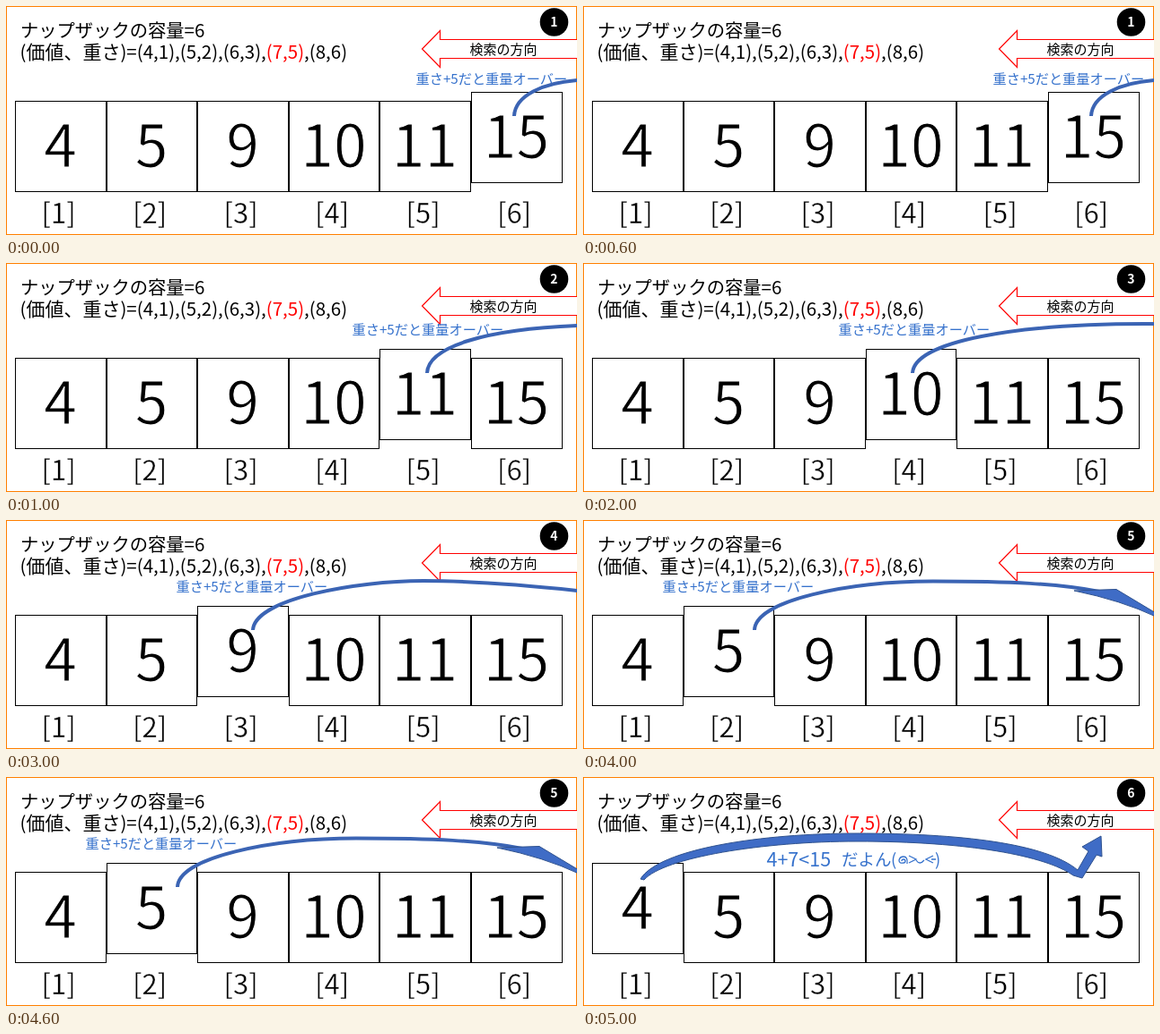
Recreate the animation shown at these times as an HTML page. Size 636 by 256 pixels, loop 6 s.

```html
<!DOCTYPE html>
<html lang="ja">
<head>
<meta charset="utf-8">
<style>
html, body { margin: 0; width: 100%; height: 100%; overflow: hidden; background: #fff; }
svg { display: block; width: 636px; height: 256px; font-family: "Noto Sans CJK JP", "Noto Sans CJK", "Noto Sans", sans-serif; }
.mid { text-anchor: middle; }
/* a thin white outline slims the strokes */
.big { font-size: 66px; stroke: #fff; stroke-width: 1; }
.tag { font-size: 31px; stroke: #fff; stroke-width: .4; }
.head { font-size: 20.5px; }
.note { font-size: 15.2px; fill: #3571cc; }
.line { fill: none; stroke: #3b64b4; stroke-width: 4; }
.solid { fill: #3f6cc6; stroke: #2f528f; stroke-width: 1; }
.face { fill: none; stroke: #3571cc; stroke-width: 1.3; }
</style>
</head>
<body>
<svg viewBox="0 0 636 256">
  <rect width="636" height="256" fill="#fff"/>
  <rect x=".5" y=".5" width="635" height="255" fill="none" stroke="#ff7f00"/>
  <text class="head" x="16" y="35"><tspan font-size="20.3">ナップザックの容量</tspan>=6</text>
  <text class="head" x="15.5" y="59">(<tspan font-size="21">価値、重さ</tspan>)=(4,1),(5,2),(6,3),<tspan fill="#f00">(7,5)</tspan>,(8,6)</text>
  <path d="M637 37.5H483.5V27.5L463.5 48L483.5 68.5V58.5H637" fill="#fff" stroke="#f00" stroke-width="1.2"/>
  <text class="mid" x="554" y="53.5" font-size="15">検索の方向</text>
  <circle cx="610.5" cy="18" r="15.8"/>
  <text id="step" class="mid" x="610.5" y="23" font-size="14" font-weight="700" fill="#fff"></text>
  <g id="cells"></g>
  <g id="tags"></g>
  <g id="scene"></g>
</svg>
<script>
const $ = id => document.getElementById(id);
const values = [4, 5, 9, 10, 11, 15];
const STEP = 1000;

const over = (x, y) => `<text class="note" x="${x}" y="${y}">重さ+5だと重量オーバー</text>`;
const curve = d => `<path class="line" d="${d}"/>`;

const scenes = [
  over(456.5, 86.5) + curve("M566 123C567 100 598 86 637 83"),
  over(385.5, 79.5) + curve("M469 123C470 93 536 74 637 70"),
  over(284.5, 79.5) + curve("M367 123C369 88 480 67 637 68"),
  over(189.5, 79.5) + curve("M275 123C277 88 390 68 465 68C530 68 590 74 637 79"),
  over(88.5, 79.5) + curve("M191 123C192 90 295 68.5 390 68.5C475 68.5 530 71 575 80") +
    `<path class="solid" d="M547 79L594 77.5L638 104V108Q600 90 547 79Z"/>`,
  `<path class="solid" d="M64 114C85 80 200 63 305 63C420 63 515 74 551 104L563 83L556 78L577 66L578 89L572 87L556 113L546 110C515 88 430 72 305 72C200 72 90 90 68 115Z"/>
  <text class="note" x="204.5" y="99.5" style="font-size:21.5px">4+7&lt;15</text>
  <g style="font-size:18.5px">
    <text x="288" y="99" fill="#3571cc">だよん</text>
    <text x="343" y="98.5" fill="#3571cc">(</text>
    <text x="392" y="98.5" fill="#3571cc">)</text>
  </g>
  <path class="face" d="M355 94a2 2 0 1 1 2 2q-5 1-5-3q1-4 5-4q5 0 4 8M363 88l8 4l-8 4M371 93q4 6 9 0M390 88l-8 4l8 4M388 92h5"/>`
];

function cell(i, up) {
  const x = Math.round(10 + i * 101.6) + .5;
  const w = Math.round(10 + (i + 1) * 101.6) - .5 - x;
  const y = up ? 96.5 : 106.5;
  return `<rect x="${x}" y="${y}" width="${w}" height="101" fill="#fff" stroke="#000"/>
    <text class="mid big" x="${x + w / 2 - .5}" y="${y + 73}">${values[i]}</text>`;
}

$("tags").innerHTML = values.map((_, i) =>
  `<text class="mid tag" x="${58.6 + i * 101.5}" y="243">[${i + 1}]</text>`).join("");

let shown = -1;
function draw(now) {
  const n = Math.floor(now / STEP) % scenes.length;
  if (n !== shown) {
    shown = n;
    const active = values.length - 1 - n;
    $("step").textContent = n + 1;
    // the raised cell lies over its neighbours
    $("cells").innerHTML = values.map((_, i) => i === active ? "" : cell(i)).join("") + cell(active, true);
    $("scene").innerHTML = scenes[n];
  }
}

const start = performance.now();
function tick() {
  draw(performance.now() - start);
  requestAnimationFrame(tick);
}
tick();
</script>
</body>
</html>
```
